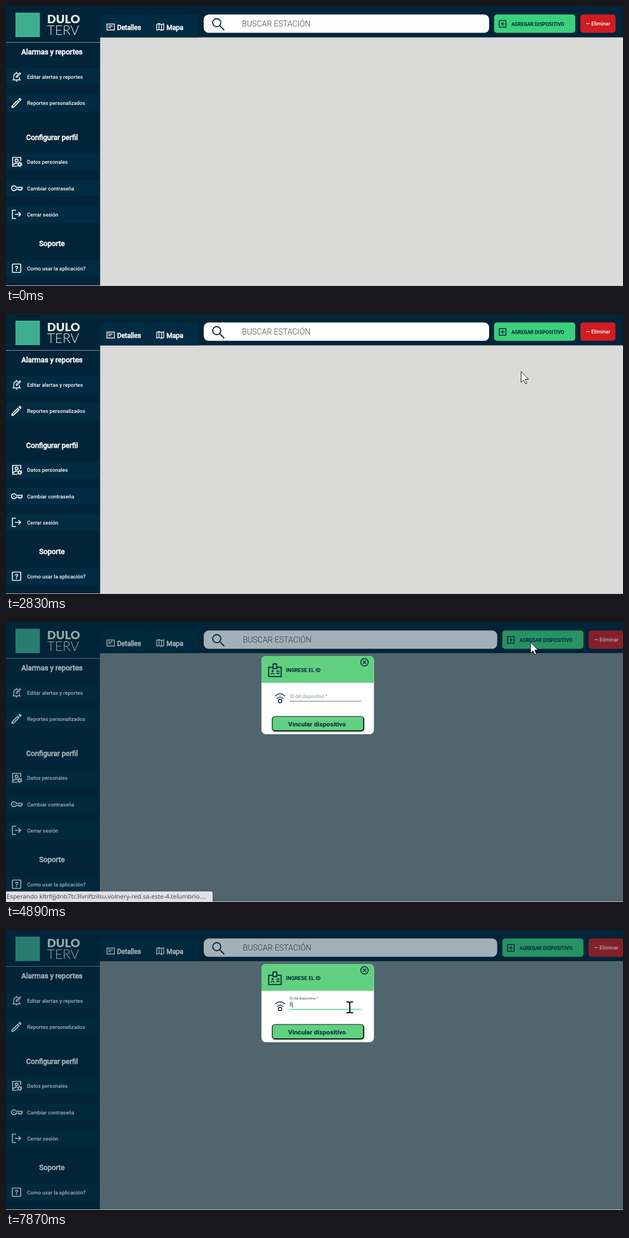
These frames come from a looping animation (1111x504 px, 8 s). An HTML page:

```html
<!DOCTYPE html>
<html lang="es">
<head>
<meta charset="utf-8">
<style>
html, body { margin: 0; width: 100%; height: 100%; overflow: hidden; background: #012438; }
svg { display: block; font-family: Roboto, sans-serif; }
.item { font-size: 9.4px; font-weight: 500; fill: #fff; }
.head { font-size: 13.1px; fill: #fff; stroke: #fff; stroke-width: .8; text-anchor: middle; }
.tab { font-size: 12px; fill: #fff; stroke: #fff; stroke-width: .75; }
.line { fill: none; stroke: #fff; stroke-width: 1.7; }
.thin { stroke-width: 1.4; }
.ink { fill: none; stroke: #06263a; stroke-width: 1.6; }
.bold { font-weight: 700; fill: #06263a; }
.arrow { fill: #fff; stroke: #000; stroke-width: .9; stroke-linejoin: round; }
</style>
</head>
<body>
<svg width="1111" height="504" viewBox="0 0 1111 504">
  <rect width="1111" height="504" fill="#012438"/>
  <rect x="169.500" y="56.500" width="942" height="448" fill="#dadad8"/>
  <path d="M0 65.500H169.500" stroke="#8b9aa3"/>

  <!-- wordmark -->
  <rect x="17" y="12" width="44" height="44" fill="#3fae8f"/>
  <g fill="#e6f6e6" font-family="Lato, sans-serif">
    <text x="74" y="31" font-size="21" font-weight="900">DULO</text>
    <text x="74" y="51.500" font-size="24" font-weight="300">TERV</text>
  </g>

  <g id="menu"></g>

  <!-- menu icons -->
  <g class="line">
    <path class="thin" d="M11.500 133H26.500M14 132.500V126.500Q14 121.500 19 121Q20.500 121 21.500 121.800M24 128V132.500M19 118.500V121M17.500 135.300H20.500M18.500 128.500V126.500L24.800 120.200 26.300 121.700 20.200 128Z"/>
    <path d="M20 288.500H12V272.500H26.500V279M13 286Q15.500 282.500 19.500 283"/>
    <circle cx="19" cy="278" r="2.600"/>
    <circle cx="24.500" cy="285" r="2.600"/>
    <circle cx="24.500" cy="285" r="4" stroke-dasharray="2.100 2.089"/>
    <path d="M18.400 326.400H29V329.600H27.300V331.300H23.500V329.600H18.400A4.400 4.400 0 1 1 18.400 326.400Z"/>
    <circle cx="14.300" cy="328" r="1" fill="#fff" stroke="none"/>
    <path d="M18 367.500H11.500V382.500H18M16 375H26M22.500 371.200L26.300 375 22.500 378.800"/>
    <rect x="11.500" y="464.500" width="15" height="15" rx="1"/>
  </g>
  <path transform="translate(7 162.300)" fill="#fff" d="M14.060 9L15 9.940 5.920 19H5V18.080L14.060 9M17.660 3Q17.250 3 16.960 3.290L15.130 5.120 18.880 8.870 20.710 7.040Q21.300 6.300 20.710 5.630L18.370 3.290Q18.070 3 17.660 3M14.060 6.190L3 17.250V21H6.750L17.810 9.940Z"/>
  <text x="19" y="476.700" font-size="13" font-weight="700" fill="#fff" text-anchor="middle">?</text>

  <!-- tabs -->
  <path d="M169 56.500V21Q169 15 175 15H252Q258 15 258 21V56.500ZM259 56.500V21Q259 15 265 15H341Q347 15 347 21V56.500Z" fill="#012b42"/>
  <g class="line">
    <path class="thin" d="M181.800 32.500H195.200V43.200H181.800ZM184 36H192M184 39H189"/>
    <path class="thin" d="M271.500 33L275.500 31.500 280 33.500 284 32V42.500L280 44 275.500 42 271.500 43.500ZM275.500 31.500V42M280 33.500V44"/>
  </g>
  <text class="tab" x="200" y="42.500">Detalles</text>
  <text class="tab" x="289" y="42.500">Mapa</text>

  <!-- search and actions -->
  <rect id="field" x="356" y="15.300" width="514" height="33" rx="9" fill="#fff"/>
  <g class="ink" style="stroke-width:2"><circle cx="379.500" cy="30" r="7.300"/><path d="M384.700 35.200L393 43.500"/></g>
  <text id="hint" x="425" y="37.300" font-size="14.250" font-weight="300" fill="#444">BUSCAR ESTACIÓN</text>
  <g id="actions">
    <rect id="add" x="879" y="15.300" width="146" height="33" rx="5"/>
    <path class="ink thin" d="M888.200 26.200H900.200V38.200H888.200ZM894.200 28.700V35.700M890.700 32.200H897.700"/>
    <text class="bold" x="910" y="36" font-size="8.800">AGREGAR DISPOSITIVO</text>
    <rect x="1034.300" y="15.300" width="63.200" height="33" rx="5" fill="#cf1d22"/>
    <path d="M1045 31.700H1051" stroke="#fff" stroke-width="1.200"/>
    <text class="item" x="1054" y="34.700">Eliminar</text>
  </g>

  <!-- dialog -->
  <g id="dialog">
    <rect width="1111" height="504" fill="#002538" opacity=".36"/>
    <rect x="169.500" y="56.500" width="942" height="448" fill="#50656d"/>
    <rect x="460" y="61" width="202.500" height="141" rx="8" fill="#fff"/>
    <path d="M460 109.500V69Q460 61 468 61H654.500Q662.500 61 662.500 69V109.500Z" fill="#61d081"/>
    <g class="ink">
      <path d="M481 81.500H473V98.200H495.500V81.500H487.500M481 75.500H487.500V84H481ZM487 88.500H492.500M487 92.500H492.500" style="stroke-width:1.900"/>
      <circle cx="480" cy="88.500" r="1.200"/>
      <path d="M476.500 94Q480 91 483.500 94"/>
      <circle cx="645.500" cy="72.500" r="6.700"/>
      <path d="M642.500 69.500L648.500 75.500M648.500 69.500L642.500 75.500M484.500 133.500Q493.500 125 502.500 133.500M488 138Q493.500 132.500 499 138"/>
      <circle cx="493.500" cy="142.200" r="3.100"/>
    </g>
    <text class="bold" x="504" y="90.300" font-size="9.450">INGRESE EL ID</text>
    <text id="label" x="511">ID del dispositivo *</text>
    <path d="M511 142.500H640" stroke="#66758c"/>
    <path id="under" stroke="#50d488" stroke-width="1.600"/>
    <text id="typed" x="511" y="137" font-size="8.200" fill="#06263a">E</text>
    <path id="caret" stroke="#06263a" stroke-width=".8"/>
    <rect x="479.500" y="170" width="164.500" height="26" rx="5" fill="#61d081" stroke="#0b1a14" stroke-width="1.200" style="filter:drop-shadow(0 2px 2px #0004)"/>
    <path d="M482 196H639Q644 196 644 191V173" fill="none" stroke="#0b1a14" stroke-width="1.800"/>
    <text class="bold" x="560" y="188" font-size="11.700" text-anchor="middle">Vincular dispositivo</text>
  </g>

  <path d="M0 503.500H1111" stroke="#b9c1c7"/>
  <g id="status">
    <path d="M0 485H369Q372 485 372 488V504H0Z" fill="#dee1e5"/>
    <text x="1" y="498" font-size="11.300" fill="#3c4043" font-family="Open Sans, sans-serif">Esperando kltrfijjdnb7tc3lvriftzilsu.volnery-red.sa-este-4.telumbrio....</text>
  </g>

  <!-- pointer -->
  <circle id="ring" cx="944" cy="36" fill="none" stroke="#777" stroke-width="3" opacity=".55"/>
  <circle id="press" cx="943.500" cy="37" r="14" fill="#ffff00" opacity=".5"/>
  <g id="pointer">
    <path id="arrow" class="arrow" d="M.5 .5V20L5 15.800 8 22.500 11 21.200 8.100 14.600H14Z"/>
    <path id="hand" class="arrow" d="M0 2A2 2 0 0 1 4 2V9.500L11 11Q13.500 12 13.500 15V19L11 26H2L-5 17.500Q-6 14.500-3 15L0 18ZM4 9V14M7.200 10.500V14.500M10.400 11V15"/>
    <path id="beam" d="M-6-9.500H-2L0-8 2-9.500H6M0-8V8.500M-6 10H-2L0 8.500 2 10H6" fill="none" stroke="#000" stroke-width="2"/>
  </g>
</svg>
<script>
const $ = id => document.getElementById(id);
const set = (id, attrs) => { for (const k in attrs) $(id).setAttribute(k, attrs[k]); };
const show = (id, on) => set(id, { display: on ? "inline" : "none" });
const ramp = (t, a, b) => Math.min(1, Math.max(0, (t - a) / (b - a)));
const ease = p => p * p * (3 - 2 * p);

const heads = [["Alarmas y reportes", 87], ["Configurar perfil", 240.5], ["Soporte", 431.5]];
const items = [["Editar alertas y reportes", 127], ["Reportes personalizados", 174.3], ["Datos personales", 280.8],
  ["Cambiar contraseña", 328], ["Cerrar sesión", 375.3], ["Como usar la aplicación?", 472.3]];
$("menu").innerHTML =
  heads.map(([s, y]) => `<text class="head" x="82.8" y="${y}">${s}</text>`).join("") +
  items.map(([s, y]) => `<rect y="${y - 15}" width="167" height="30" rx="3" fill="#012b42"/>
    <text class="item" x="38" y="${y + 3.5}">${s}</text>`).join("");

// pointer stops: time, x, y
const stops = [[190, 1048, 452], [610, 992, 186], [1600, 992, 186], [1670, 980, 186], [2290, 925, 106],
  [2550, 925, 106], [2630, 927, 103], [2830, 927, 103], [3460, 944, 36], [5150, 944, 36],
  [5630, 648, 154], [5920, 619, 139]];

function pointerAt(t) {
  const i = stops.findIndex(s => s[0] > t);
  if (i < 0) return stops.at(-1).slice(1);
  if (i === 0) return stops[0].slice(1);
  const [a, b] = [stops[i - 1], stops[i]];
  const n = Math.max(1, Math.round((b[0] - a[0]) / 70));
  const p = Math.floor(ramp(t, a[0], b[0]) * n + 1e-6) / n;
  return [a[1] + (b[1] - a[1]) * p, a[2] + (b[2] - a[2]) * p];
}

// rings close in on the pointer, one step every 70 ms
function ringRadius(t) {
  const start = t < 4300 ? 3660 : 4340;
  const step = Math.floor((t - start) / 70);
  return t < 3730 || step < 0 || step > 4 ? 0 : 59 - 11.8 * step;
}

function draw(t) {
  const open = t >= 4890;
  const [x, y] = pointerAt(t);
  const over = !open && t > 2830 && y < 48;
  const beam = t >= 5920;

  show("dialog", open);
  show("status", open && t < 5290);
  set("field", { width: open ? 528.5 : 514 });
  set("hint", { x: open ? 426.5 : 425 });
  set("actions", { transform: `translate(${open ? 14.8 : 0})` });
  set("add", { fill: over ? "#7fe0a4" : "#3dd07c" });

  show("pointer", t >= 190);
  set("pointer", { transform: `translate(${x} ${y})` });
  show("arrow", !over && !beam);
  show("hand", over);
  show("beam", beam);
  const r = ringRadius(t);
  show("ring", r > 0);
  set("ring", { r });
  show("press", t >= 4690 && !open);

  const lift = ease(ramp(t, 6100, 6500));
  const half = 64.5 * ease(ramp(t, 6100, 6420));
  set("label", { y: 137 - 12 * lift, "font-size": 8.2 - 2.05 * lift, fill: lift > 0 ? "#29434f" : "#8b9a8b" });
  set("under", { d: `M${575.5 - half} 142.7H${575.5 + half}` });

  const typed = t >= 7870;
  show("typed", typed);
  show("caret", typed || (t >= 6120 && t < 6670) || (t >= 7200 && t < 7670));
  set("caret", { d: `M${typed ? 515.8 : 511.5} 130V140` });
}

function tick() {
  draw(performance.now() % 8000);
  requestAnimationFrame(tick);
}
tick();
</script>
</body>
</html>
```
